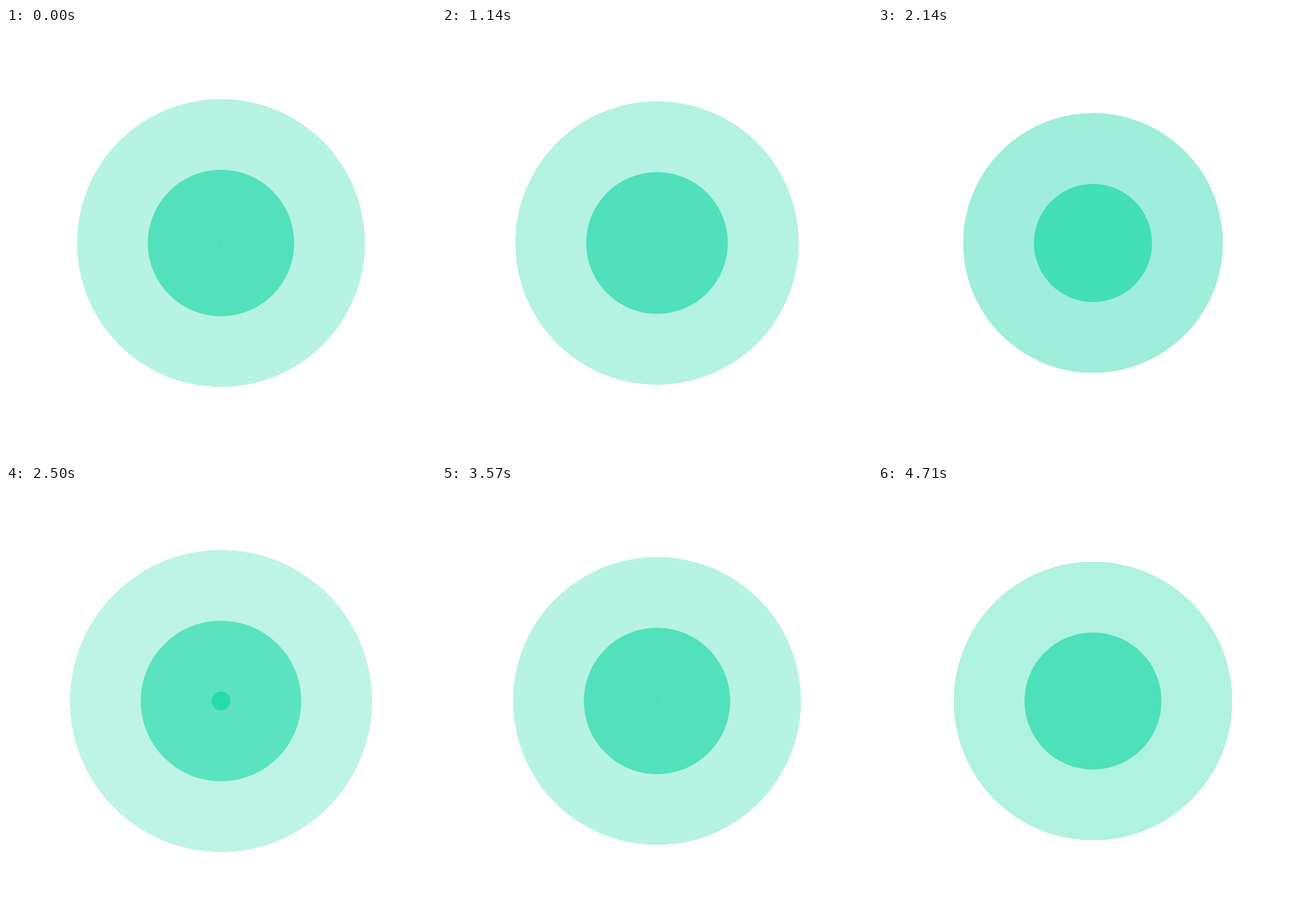
An HTML page with a canvas that plays this animation: 640x640 px, repeating every 4780 ms.

```html
<!DOCTYPE html>
<html lang="en">
<head>
<meta charset="utf-8">
<title>Ripple loader</title>
<style>
  html, body { margin: 0; width: 100%; height: 100%; overflow: hidden; background: #fff; }
  canvas { display: block; width: 100vw; height: 100vh; }
</style>
</head>
<body>
<canvas id="stage" width="640" height="640"></canvas>
<script>
const SIZE = 640;
const LOOP = 4780;
const SPACING = 30;       // ticks between ripples
const LIFE = 90;          // ticks a ripple lives
const FADE_IN = 0.05 * LIFE;
const GROWTH = 3.516;     // pixels of radius per tick
const MAX_OPACITY = 0.95;
const MIN_ALPHA = 50;     // fainter pixels are dropped, leaving hard outer edges

const ctx = document.getElementById("stage").getContext("2d", { willReadFrequently: true });
ctx.fillStyle = "rgb(32, 216, 168)";
let shownStep = -1;

function opacity(age) {
  const level = age < FADE_IN ? age / FADE_IN : (LIFE - age) / (LIFE - FADE_IN);
  return MAX_OPACITY * level;
}

function drawRipple(age) {
  ctx.globalAlpha = opacity(age);
  ctx.beginPath();
  ctx.arc(SIZE / 2, SIZE / 2, age * GROWTH, 0, Math.PI * 2);
  ctx.fill();
}

function dropFaintPixels() {
  const image = ctx.getImageData(0, 0, SIZE, SIZE);
  const data = image.data;
  for (let i = 3; i < data.length; i += 4) {
    if (data[i] < MIN_ALPHA) data[i] = 0;
  }
  ctx.putImageData(image, 0, 0);
}

// 14 steps a second, sampling ripples that advance 25 ticks a second.
function stepAt(time) {
  return Math.floor((Math.floor(time / 10) + 0.5) * 0.14);
}

function draw(step) {
  const phase = (1 + Math.floor((25 * step + 12) / 14)) % SPACING;
  ctx.clearRect(0, 0, SIZE, SIZE);
  for (let age = phase; age < LIFE; age += SPACING) drawRipple(age);
  dropFaintPixels();
}

const start = performance.now();

function tick() {
  const step = stepAt((performance.now() - start) % LOOP);
  if (step !== shownStep) {
    draw(step);
    shownStep = step;
  }
  requestAnimationFrame(tick);
}

tick();
</script>
</body>
</html>
```
